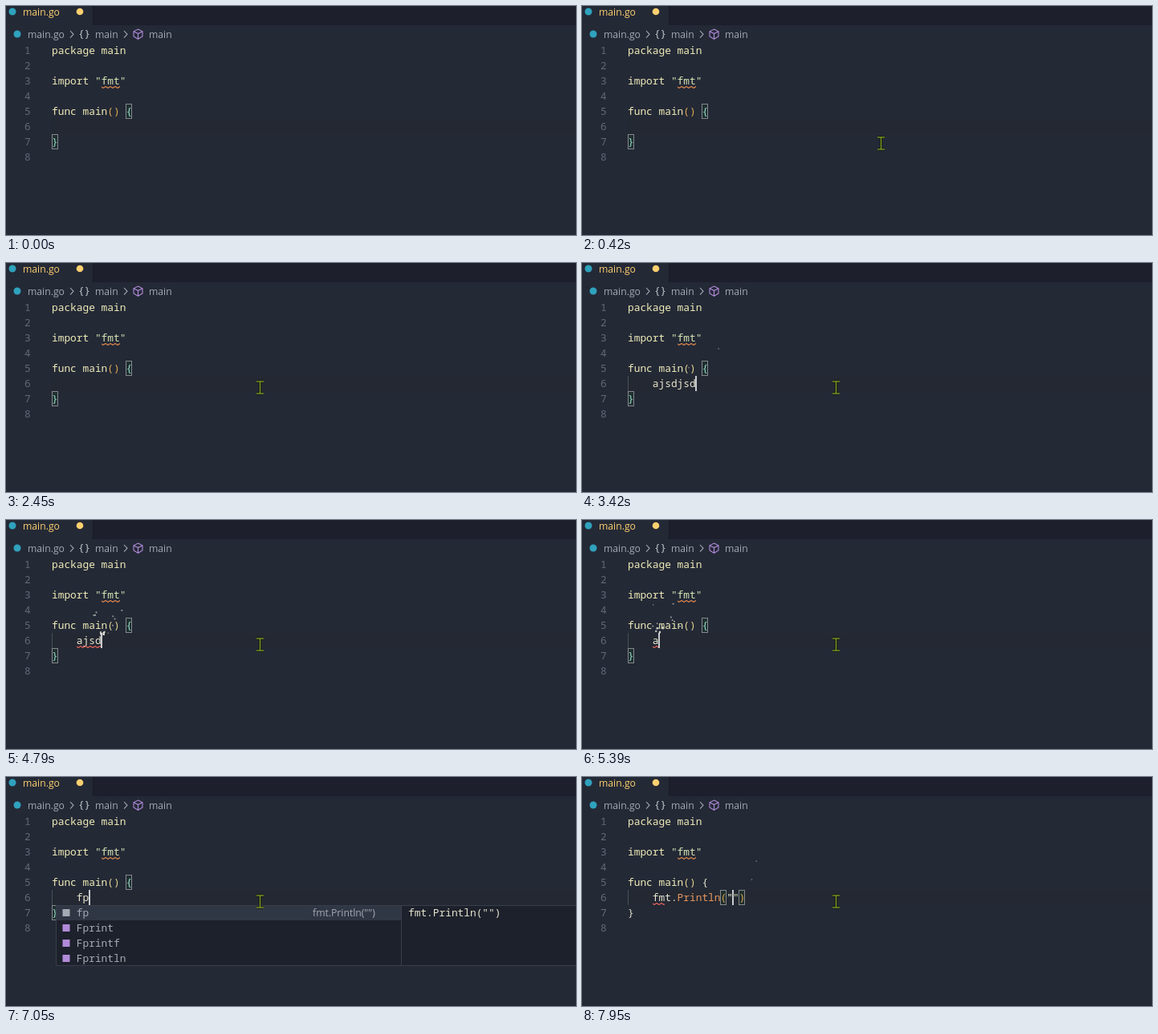
Recreate the animation shown at these times as an HTML page with a canvas. Size 710x286 px, loop 8 s.

```html
<!DOCTYPE html>
<html lang="en">
<head>
<meta charset="utf-8">
<title>Editor</title>
<style>
html, body { margin: 0; width: 100%; height: 100%; overflow: hidden; background: #242936; }
canvas { display: block; }
</style>
</head>
<body>
<canvas id="stage" width="710" height="286"></canvas>
<script>
const ctx = document.getElementById("stage").getContext("2d");
const LOOP = 8000;
const CHAR = 7.7, LEFT = 57, LINE = 19, TOP = 46;
const CODE_FONT = '12.83px "Noto Sans Mono", monospace';
const UI_FONT = '12.2px "Open Sans", sans-serif';
const INDENT = 4;
const C = {
  bg: "#242936", bar: "#1d202c", row: "#232832", number: "#626a75", ui: "#a5abb4",
  tab: "#ffd06f", word: "#f0edb9", plain: "#e8e6cf", string: "#d9e6b5", gold: "#dfa94f",
  pale: "#e2d58f", brace: "#91dcc3", call: "#e9975e", box: "#85888c",
  warn: "#e58a4c", error: "#f2665e", caret: "#c9cbcf", go: "#2fa2bd", cube: "#b18bd8"
};

const TYPED = "ajsdjsd";
const keys = [];
for (let i = 0; i < 7; i++) keys.push({ t: 2580 + i * 71.7, text: TYPED.slice(0, i + 1) });
for (let i = 0; i < 7; i++) keys.push({ t: 4360 + i * 193.3, text: TYPED.slice(0, 6 - i) });
keys.push({ t: 6440, text: "f" }, { t: 6560, text: "fp" });
keys.push({ t: 7510, text: 'fmt.Println("")', caret: 13 });

const colX = col => LEFT + col * CHAR;
const lineY = n => TOP + (n - 1) * LINE;
const caretCol = key => INDENT + (key.caret ?? key.text.length);

function random(seed) {
  const v = Math.sin(seed * 127.1 + 11.7) * 43758.5453;
  return v - Math.floor(v);
}

function rect(x, y, w, h, color) {
  ctx.fillStyle = color;
  ctx.fillRect(x, y, w, h);
}

function text(str, x, y, color, font = UI_FONT) {
  ctx.font = font;
  ctx.fillStyle = color;
  ctx.fillText(str, x, y);
}

function code(line, col, ...tokens) {
  for (const [str, color] of tokens) {
    text(str, colX(col), lineY(line) + 14, color, CODE_FONT);
    col += str.length;
  }
}

function path(points, color, width, close) {
  ctx.beginPath();
  points.forEach(([x, y]) => ctx.lineTo(x, y));
  if (close) ctx.closePath();
  ctx.strokeStyle = color;
  ctx.lineWidth = width;
  ctx.stroke();
}

function dot(x, y, r, color) {
  ctx.beginPath();
  ctx.arc(x, y, r, 0, Math.PI * 2);
  ctx.fillStyle = color;
  ctx.fill();
}

function squiggle(line, col, count, color) {
  const x = Math.round(colX(col)), y = lineY(line) + 16, w = Math.round(count * CHAR);
  ctx.save();
  ctx.beginPath();
  ctx.rect(x, y, w, 3);
  ctx.clip();
  const points = [];
  for (let i = 0; i <= w + 6; i += 3) points.push([x - 1 + i, y + (i % 2 ? 2.5 : 0.5)]);
  path(points, color, 1.1);
  ctx.restore();
}

function bracketBox(line, col) {
  const x = Math.floor(colX(col)), y = lineY(line);
  rect(x, y, 8, LINE, "rgba(0,100,0,.1)");
  ctx.strokeStyle = C.box;
  ctx.lineWidth = 1;
  ctx.strokeRect(x + 0.5, y + 0.5, 7, LINE - 1);
}

function drawHeader() {
  rect(0, 0, 710, 24, C.bar);
  rect(0, 0, 108, 25, C.bg);
  rect(108, 0, 1, 24, "#171a24");
  dot(8, 7, 4.5, C.go);
  text("main.go", 21, 11.5, C.tab);
  dot(92, 7, 4.3, C.tab);

  dot(14, 35, 4.5, C.go);
  text("main.go", 27, 40, C.ui);
  for (const x of [80, 147]) path([[x, 31], [x + 4, 35.3], [x, 39.6]], C.ui, 1.1);
  text("{}", 90, 39, "#c6cad0", '12.5px "Noto Sans Mono", monospace');
  text("main", 111, 40, C.ui);
  path([[164.5, 29], [170, 31.8], [170, 38], [164.5, 41.3], [159, 38], [159, 31.8]], C.cube, 1.1, true);
  path([[159, 31.8], [164.5, 34.6], [170, 31.8]], C.cube, 1.1);
  path([[164.5, 34.6], [164.5, 41]], C.cube, 1.1);
  text("main", 178, 40, C.ui);
}

function drawCode(t, key) {
  const str = key ? key.text : "";
  const expanded = str.includes("(");
  const brace = expanded ? C.plain : C.brace;
  rect(LEFT, lineY(6), 710 - LEFT, LINE, C.row);
  for (let n = 1; n <= 8; n++) text(String(n), 23, lineY(n) + 14, C.number, CODE_FONT);

  if (!expanded) {
    bracketBox(5, 12);
    bracketBox(7, 0);
  }
  code(1, 0, ["package main", C.word]);
  code(3, 0, ["import ", C.word], ['"fmt"', C.string]);
  squiggle(3, 8, 3, C.warn);
  code(5, 0, ["func main", C.word], ["() ", t < 2580 ? C.gold : C.pale], ["{", brace]);
  code(7, 0, ["}", brace]);

  if (str) rect(LEFT, lineY(6), 1, LINE, "#4a4f55");
  if (expanded) {
    bracketBox(6, INDENT + 11);
    bracketBox(6, INDENT + 14);
    code(6, INDENT, ["fmt.", C.plain], ["Println", C.call], ["(", C.gold], ['""', C.string], [")", C.gold]);
  } else {
    code(6, INDENT, [str, C.plain]);
  }
  if (t >= 3780 && t < 6260) squiggle(6, INDENT, Math.max(1, str.length), C.error);
  if (t >= 7230) squiggle(6, INDENT, 2, C.error);
}

function drawCaret(t, key) {
  const start = key ? key.t : 950;
  const on = t >= start && Math.floor((t - start) / 505) % 2 === 0;
  if (on && !(t >= 2450 && !key)) {
    rect(Math.floor(colX(key ? caretCol(key) : INDENT)), lineY(6), 2, LINE, C.caret);
  }
}

function drawSparks(t) {
  keys.forEach((key, k) => {
    const age = (t - key.t) / 1000;
    if (age < 0 || age > 0.49) return;
    const x0 = colX(caretCol(key));
    ctx.save();
    ctx.beginPath();
    ctx.rect(x0 - 31, 103, 61, 57);
    ctx.clip();
    for (let i = 0; i < 7; i++) {
      const seed = k * 31 + i * 4;
      const life = 0.32 + random(seed) * 0.17;
      if (age > life) continue;
      const x = x0 + (random(seed + 1) - 0.5) * 150 * age;
      const y = 148 - (150 + random(seed + 2) * 120) * age + 350 * age * age;
      const size = 2.2 - age * 2;
      ctx.globalAlpha = 0.9 - 0.4 * age / life;
      rect(x, y, size, size, "#e4e4dc");
    }
    ctx.restore();
  });
}

function drawSuggestions(t) {
  if (t < 6700 || t >= 7510) return;
  const x = 62, y = 160, w = 430;
  rect(x, y, 710 - x, 76, "#1d212c");
  rect(x, y, w, LINE, "#303744");
  ["fp", "Fprint", "Fprintf", "Fprintln"].forEach((name, i) => {
    const base = y + i * LINE + 14;
    rect(x + 8.5, base - 9, 9, 9, i ? C.cube : C.ui);
    text(name, colX(INDENT), base, C.ui, CODE_FONT);
  });
  text('fmt.Println("")', w - 48, y + 14, C.ui);
  text('fmt.Println("")', x + w + 9, y + 14, C.plain, CODE_FONT);
  ctx.strokeStyle = "#383e4a";
  ctx.lineWidth = 1;
  ctx.strokeRect(x + 0.5, y + 0.5, w, 75);
  ctx.strokeRect(x + w + 0.5, y + 0.5, 710 - x - w, 75);
}

function drawPointer(t) {
  if (t < 60) return;
  const p = Math.min(1, (t - 60) / 640);
  const left = (1 - p) ** 2;
  let x = 316 + 296 * left, y = 155 + 109 * left ** 1.15;
  if (t >= 950 && t < 1040) [x, y] = [321, 157];
  x = Math.round(x) + 0.5;
  y = Math.round(y) + 0.5;
  for (const [color, width] of [["#12170f", 3], ["#86a326", 1.3]]) {
    path([[x - 4.5, y - 7.5], [x + 4.5, y - 7.5]], color, width);
    path([[x - 4.5, y + 7.5], [x + 4.5, y + 7.5]], color, width);
    path([[x, y - 7.5], [x, y + 7.5]], color, width);
  }
}

function draw(t) {
  const key = keys.filter(k => k.t <= t).pop();
  rect(0, 0, 710, 286, C.bg);
  drawHeader();
  drawCode(t, key);
  drawCaret(t, key);
  drawSparks(t);
  drawSuggestions(t);
  drawPointer(t);
}

const begin = performance.now();
function tick() {
  draw((performance.now() - begin) % LOOP);
  requestAnimationFrame(tick);
}
tick();
</script>
</body>
</html>
```
